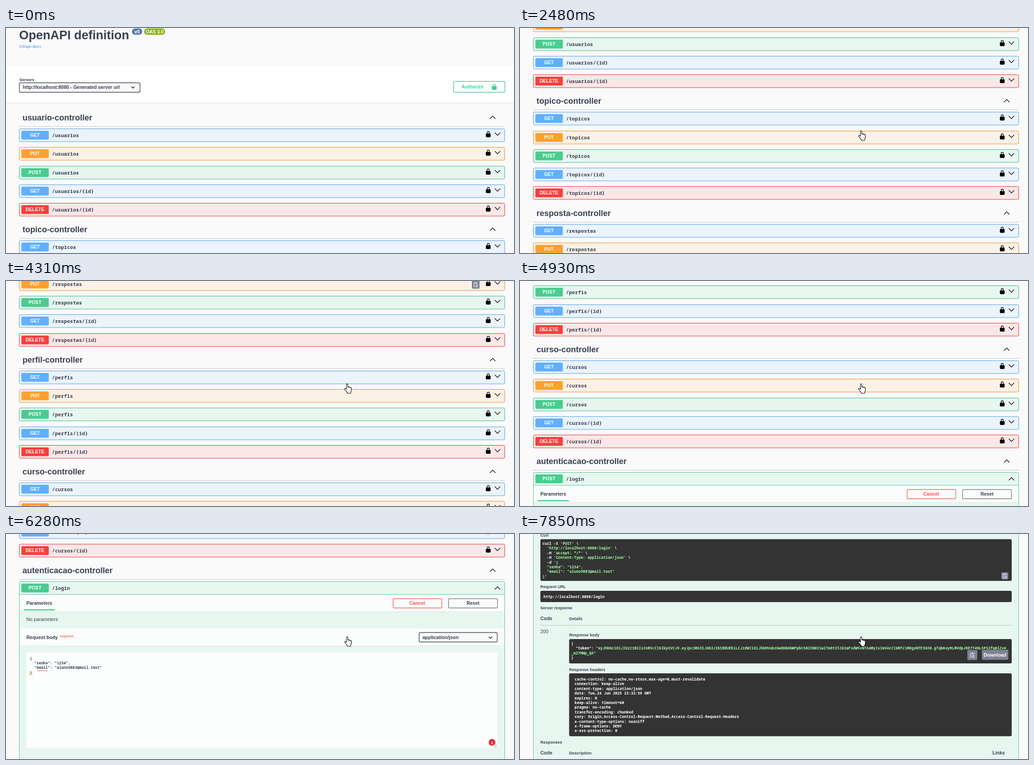
Recreate the animation shown at these times as an HTML page. Size 1122x499 px, loop 8 s.

```html
<!DOCTYPE html>
<html lang="en">
<head>
<meta charset="utf-8">
<title>API docs</title>
<style>
  html, body { margin: 0; width: 100%; height: 100%; overflow: hidden; background: #fafafa; }
  svg { display: block; }
  text { font-family: "Liberation Sans", Arial, sans-serif; fill: #3b4151; white-space: pre; }
  .bold { font-weight: 700; }
  .mono { font-family: "Noto Sans Mono", monospace; font-weight: 700; }
</style>
</head>
<body>
<svg id="stage" width="1122" height="499" viewBox="0 0 1122 499"></svg>
<script>
const INK = '#3b4151', GREEN = '#49cc90', STRING = '#a2fca2', DARK = '#333';
const METHODS = { GET: '#61affe', PUT: '#fca130', POST: GREEN, DELETE: '#f93e3e' };
const LOCK = 'M15.8 8H14V5.6C14 2.7 12.7 1 10 1S6 2.7 6 5.6V8H4c-.55 0-1 .65-1 1.2V17c0 .55.43 1.14.95 1.3l1.2.4c.52.16 1.4.3 1.95.3h5.8c.55 0 1.43-.14 1.95-.3l1.2-.4c.52-.16.95-.75.95-1.3V9.2C17 8.65 16.35 8 15.8 8zM12 8H8V5.2C8 3.75 8.8 3 10 3s2 .75 2 2.2z';
const HAND = 'M5 13V2.5a1.5 1.5 0 0 1 3 0V8.5a1.4 1.4 0 0 1 2.7.3 1.4 1.4 0 0 1 2.6.7 1.3 1.3 0 0 1 2.4.8V15c0 2-1 3-1.5 5V22H6.5V20L1.2 13.5C0 11.5 2 10.5 3.2 11.7Z';

const text = (x, y, s, size, { bold = 1, fill = INK, anchor = 'start' } = {}) =>
  `<text x="${x}" y="${y}" font-size="${size}" text-anchor="${anchor}" ${bold ? 'class="bold"' : ''} style="fill:${fill}">${s}</text>`;
const mono = (x, y, s, size = 8.3, fill = INK) =>
  `<text class="mono" x="${x}" y="${y}" font-size="${size}" style="fill:${fill}">${s}</text>`;
const rect = (x, y, w, h, fill, extra = '') =>
  `<rect x="${x}" y="${y}" width="${w}" height="${h}" fill="${fill}" ${extra}/>`;
const outline = (x, y, w, h, color, rx = 3, fill = 'none') =>
  rect(x, y, w, h, fill, `rx="${rx}" stroke="${color}" stroke-width="1.4"`);
const line = (d, color = '#111', width = 1.4) =>
  `<path d="${d}" fill="none" stroke="${color}" stroke-width="${width}"/>`;
const lock = (x, y, fill = '#000') =>
  `<path transform="translate(${x} ${y}) scale(.75)" d="${LOCK}" fill="${fill}"/>`;
const chevron = (x, y, r, dir) => line(`M${x - r} ${y - dir * r / 2}l${r} ${dir * r} ${r} ${-dir * r}`);
const green = s => `<tspan style="fill:${STRING}">${s}</tspan>`;
const codeLines = (x, y, lines, fill) => lines.map((s, i) => mono(x, y + i * 10.4, s, 8.3, fill)).join('');
const band = (y, h) => rect(30, y + h, 1071, 1, '#000', 'opacity=".07"') + rect(30, y, 1071, h, '#fafdfc');
const copyButton = (x, y, w, h) => {
  const cx = x + w / 2, cy = y + h / 2;
  return rect(x, y, w, h, '#7d8293', 'rx="2.5"') +
    line(`M${cx + 4} ${cy - 1}V${cy - 4}H${cx - 4}V${cy + 5}H${cx + 4}V${cy + 3.5}M${cx - 2} ${cy - 4.5}h4M${cx - 2} ${cy - 1.5}h3M${cx - 2} ${cy + 2}h2M${cx + 5} ${cy + 1.5}h-4m2 -2l-2 2 2 2`, '#fff', 1);
};

function methodLabel(y, method, path) {
  return rect(34, y + 5, 60.5, 19.5, METHODS[method], 'rx="2"') +
    text(64, y + 18, method, 10.5, { fill: '#fff', anchor: 'middle' }) +
    mono(101.5, y + 19, path, 11.05);
}

function row(y, method, path) {
  const color = METHODS[method];
  return rect(29.5, y + .5, 1072, 29, 'none', 'rx="3" stroke="#000" stroke-opacity=".05" stroke-width="3"') +
    rect(29.5, y + .5, 1072, 28.5, color, `rx="3" fill-opacity=".1" stroke="${color}"`) +
    methodLabel(y, method, path) + lock(1057.6, y + 5) + chevron(1085.5, y + 12, 6, 1);
}

function heading(y, name) {
  const baseline = Math.round(y + 7);
  return text(36.5, baseline, name + '-controller', 18) + chevron(1075, baseline - 6.5, 6, -1) +
    rect(29, Math.round(y + 20), 1073, 1, '#c4c6ca');
}

function section(name, plural, index) {
  const y = 198.2 + index * 248.25;
  const rows = ['GET', 'PUT', 'POST', 'GET', 'DELETE'].map((method, i) =>
    row(Math.round(y + 24.8 + i * 41.3), method, '/' + plural + (i > 2 ? '/{id}' : '')));
  return heading(y, name) + rows.join('');
}

function topPart() {
  return text(29, 25, 'OpenAPI definition', 27) +
    rect(278, 1, 23, 14, '#5a7da5', 'rx="7"') + text(289.5, 11.6, 'v0', 10.3, { fill: '#fff', anchor: 'middle' }) +
    rect(305, 1, 46.5, 14, '#89b30b', 'rx="7"') + text(328.3, 11.6, 'OAS 3.0', 10.2, { fill: '#fff', anchor: 'middle' }) +
    text(29, 43.5, '/v3/api-docs', 9, { bold: 0, fill: '#4990e2' }) +
    rect(0, 84, 1122, 82, '#fff') + rect(0, 165.5, 1122, 1, '#dcdcdc') +
    text(29.5, 118, 'Servers', 9) + outline(29.5, 121.5, 266.5, 21, '#41444e', 3, '#f9f9f9') +
    text(37, 135, 'http://localhost:8080 - Generated server url', 10.5) + chevron(280.5, 131.5, 3.6, 1) +
    outline(988.5, 118.5, 113.5, 24, GREEN) + text(1006, 134.3, 'Authorize', 10.5, { fill: GREEN }) +
    lock(1071, 123, GREEN);
}

const email = 'aluno5083@mail.test';
const body = ['  "senha": "1234",', `  "email": "${email}"`];

// Login form; y is measured from the top of the opened block.
function loginForm() {
  return rect(29.5, .5, 1072, 1200, GREEN, `rx="3" fill-opacity=".1" stroke="${GREEN}"`) +
    methodLabel(0, 'POST', '/login') + chevron(1085.5, 15, 6, -1) +
    band(29, 38) + rect(30, 28.5, 1071, 1, GREEN) +
    text(45, 51.5, 'Parameters', 10.5) + rect(39, 62, 69, 2.6, GREEN) +
    outline(855, 38.5, 107.5, 20.5, '#f26161', 2) + text(908, 51.7, 'Cancel', 10.5, { fill: '#f25050', anchor: 'middle' }) +
    outline(977.5, 38.5, 108, 20.5, '#787b85', 2) + text(1031.5, 51.7, 'Reset', 10.5, { anchor: 'middle' }) +
    text(45, 88, 'No parameters', 10.5, { bold: 0 }) +
    band(104.5, 38) + text(45, 127.6, 'Request body', 10.5) +
    text(119, 123.6, 'required', 8.1, { bold: 0, fill: '#f33' }) +
    outline(912.5, 113.5, 172.5, 21, '#41444e', 3, '#f8faf9') +
    text(920, 127.8, 'application/json', 10.5) + chevron(1070, 124.5, 3.6, 1) +
    rect(45, 158, 1041, 211, '#fcfefd', 'rx="2"') +
    codeLines(52.5, 173.5, ['{', ...body, '}']) +
    line('M68 198' + 'q1.5 -2 3 0t3 0'.repeat(4), '#e33', 1) + line('M50 206.5h9', '#f90', 1.2) +
    '<circle cx="1073.5" cy="357" r="7.5" fill="#e62e3e"/>' +
    text(1073.5, 360.5, '1', 9, { fill: '#fff', anchor: 'middle' }) + line('M1078 368l6-6M1081 368l3-3', '#888', 1) +
    rect(52, 408, 513, 26, '#4990e2', 'rx="3"') + text(308, 424.7, 'Execute', 10.5, { fill: '#fff', anchor: 'middle' }) +
    outline(565, 408.5, 514, 25, '#888b93') + text(822, 424.7, 'Clear', 10.5, { anchor: 'middle' }) +
    band(456, 38) + text(45, 478.5, 'Responses', 10.5);
}

const base64 = s => btoa(s).replace(/=/g, '');
const token = [
  base64('{"alg":"HS256","typ":"JWT"}'),
  base64(`{"iss":"Forum API","sub":"${email}","Nome":"${email.split('@')[0]}","exp":1750815179}`),
  'gTqbKoyRLMVdpJRE774NL5PS2fq0lZvA_'
].join('.');

function response() {
  const box = (x, y, h) => rect(x, y, 1086 - x, h, DARK, 'rx="3"');
  const tableHead = (y, label) => text(45, y, 'Code', 10.5) + text(108.5, y, label, 9);
  const curl = [
    `curl -X ${green("'POST'")} \\`,
    `  ${green("'http://localhost:8080/login'")} \\`,
    `  -H ${green("'accept: */*'")} \\`,
    `  -H ${green("'Content-Type: application/json'")} \\`,
    `  -d ${green("'{")}`, ...body.map(green), green("}'")
  ];
  const headers = [
    'cache-control: no-cache,no-store,max-age=0,must-revalidate', 'connection: keep-alive',
    'content-type: application/json', 'date: Tue,24 Jun 2025 23:32:59 GMT', 'expires: 0',
    'keep-alive: timeout=60', 'pragma: no-cache', 'transfer-encoding: chunked',
    'vary: Origin,Access-Control-Request-Method,Access-Control-Request-Headers',
    'x-content-type-options: nosniff', 'x-frame-options: DENY', 'x-xss-protection: 0'
  ];
  return text(45, 6, 'Curl', 9) + box(45, 11.5, 92.5) + codeLines(49.5, 24, curl, '#fff') +
    copyButton(1063, 85, 15.5, 15.5) +
    text(45, 120, 'Request URL', 9) + box(45, 126, 25) + mono(52, 141.8, 'http://localhost:8080/login', 8.3, '#fff') +
    text(45, 167, 'Server response', 9) + tableHead(191, 'Details') +
    rect(45, 202, 1041, 1, '#b3bfba') + text(45, 220.3, '200', 10.5, { bold: 0 }) +
    text(108.5, 227, 'Response body', 9) + box(108.5, 233, 54) +
    codeLines(113, 246, ['{', `  "token": ${green('"' + token)}`, green('_m27NWp_QA"'), '}'], '#fff') +
    copyButton(988, 257.5, 22, 22) + rect(1020, 257, 58.5, 22, '#7d8293', 'rx="3"') +
    text(1049, 271.5, 'Download', 10.5, { fill: '#fff', anchor: 'middle' }) +
    text(108.5, 303.5, 'Response headers', 9) + box(108.5, 309, 139.5) + codeLines(120.5, 325, headers, '#fff') +
    text(45, 465, 'Responses', 9) + tableHead(489, 'Description') + text(1043.5, 489, 'Links', 10.5);
}

const names = [['usuario', 'usuarios'], ['topico', 'topicos'], ['resposta', 'respostas'], ['perfil', 'perfis'], ['curso', 'cursos']];
document.getElementById('stage').innerHTML =
  `<g id="page">${topPart()}${names.map(([name, plural], i) => section(name, plural, i)).join('')}
   <g id="copy">${copyButton(1029, 768, 17, 18)}</g>
   ${heading(1439.4, 'autenticacao')}
   <g transform="translate(0 1464)">${loginForm()}</g>
   <g transform="translate(0 1985)">${response()}</g></g>
   <path id="cursor" d="${HAND}" fill="#fff" stroke="#000" stroke-width="1.1"/>`;
const [page, copy, cursor] = ['page', 'copy', 'cursor'].map(id => document.getElementById(id));

// Wheel moves: first step, last step, number of steps, head start (ms), resting position.
const scrolls = [
  [1410, 1820, 7, 40, 283.5], [2480, 2830, 6, 18, 472.5], [3290, 3980, 11, 68, 756],
  [4310, 4520, 4, 40, 945], [4720, 4930, 4, 40, 1040], [5590, 5870, 5, 60, 1228.5],
  [6140, 6420, 5, 100, 1417.5], [6690, 6970, 5, 60, 1701], [7500, 7850, 6, 60, 1985]
];

function progress(t, start, end, steps, lead) {
  if (t < start) return 0;
  const dt = (end - start) / (steps - 1);
  const k = Math.min(steps - 1, Math.floor((t - start) / dt + 1e-6));
  const u = (lead + k * dt) / (lead + end - start);
  return u * u * (3 - 2 * u);
}

function draw(now) {
  const t = now % 8000;
  let y = 0, from = 0;
  for (const [start, end, steps, lead, to] of scrolls) {
    y += (to - from) * progress(t, start, end, steps, lead);
    from = to;
  }
  page.setAttribute('transform', `translate(0 ${-Math.round(y)})`);
  copy.setAttribute('visibility', t >= 3640 ? 'visible' : 'hidden');
  const p = progress(t, 390, 1080, 11, 60);
  cursor.setAttribute('visibility', t >= 390 ? 'visible' : 'hidden');
  cursor.setAttribute('transform', `translate(${1034 - 287 * p} ${484 - 257 * p})`);
  requestAnimationFrame(draw);
}
requestAnimationFrame(draw);
</script>
</body>
</html>
```
